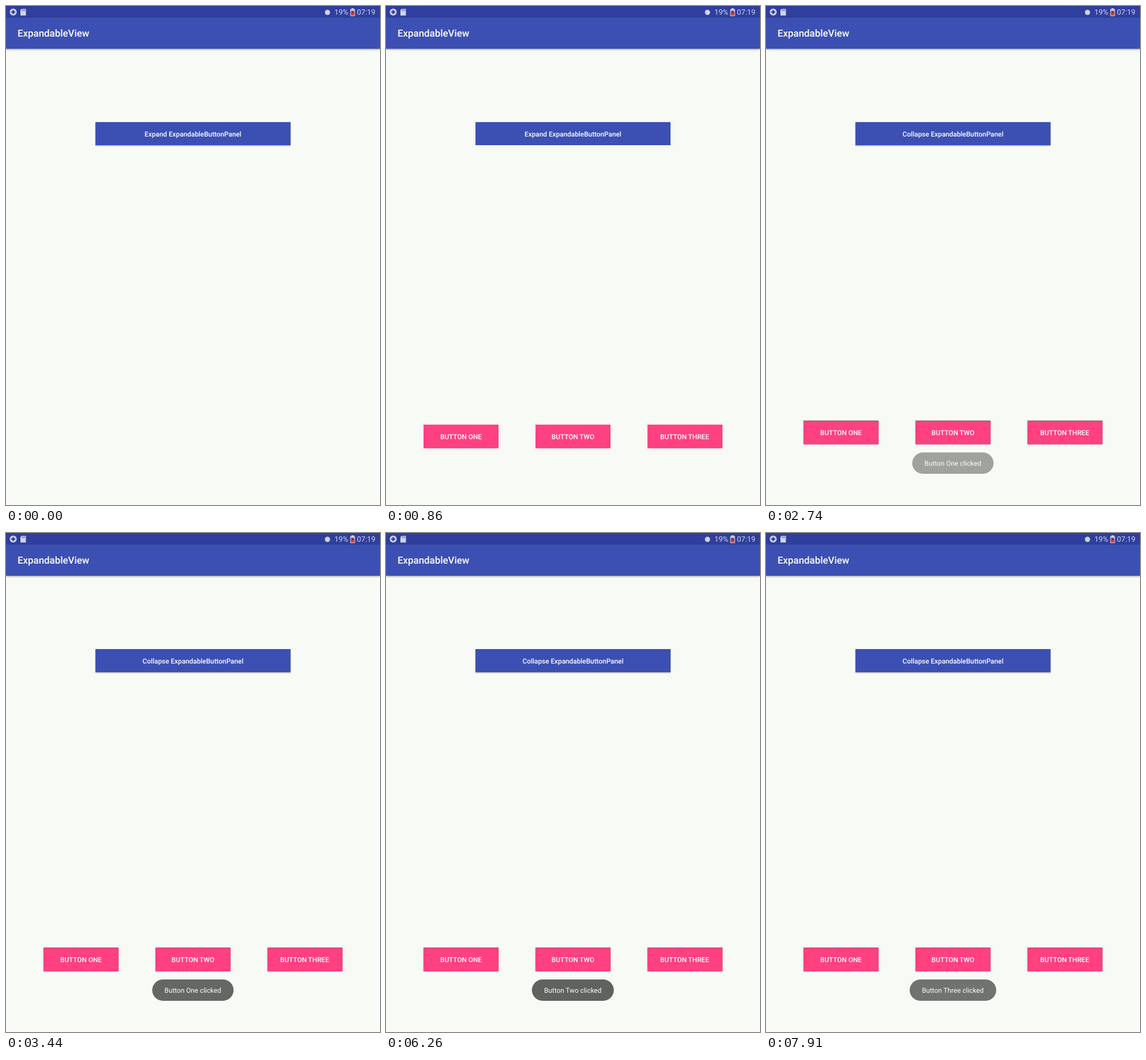
An HTML page for the animation above (8000 ms loop, 648 px wide and 864 px high).

```html
<!DOCTYPE html>
<html lang="en">
<head>
<meta charset="utf-8">
<title>ExpandableView</title>
<style>
  html, body { margin: 0; width: 100%; height: 100%; overflow: hidden; }
  #stage {
    position: relative; width: 648px; height: 864px; overflow: hidden;
    background: #f8faf5; color: #fff; font: 500 11.8px Roboto, sans-serif;
    text-rendering: geometricPrecision;
  }
  #stage > * { position: absolute; box-sizing: border-box; white-space: nowrap; }
  #status { left: 0; top: 0; }
  #appbar {
    left: 0; top: 20px; width: 648px; height: 54px; padding-left: 20px;
    background: #3c50b3; box-shadow: 0 1px 3px rgba(0, 0, 0, .45);
    font-size: 16.875px; line-height: 56px;
  }
  .button { display: flex; align-items: center; justify-content: center; }
  #toggle { left: 155px; top: 201px; width: 338px; height: 40px; padding-top: 1px; background: #3c50b3; }
  .panel { top: 718px; width: 130px; height: 41px; background: #ff4081; }
  .toast {
    left: 323.7px; top: 773px; height: 37px; padding: 0 21.5px; border-radius: 18.5px;
    transform: translateX(-50%); background: #5f625e;
    font-weight: 400; line-height: 38px; opacity: 0;
  }
</style>
</head>
<body>
<div id="stage">
  <svg id="status" width="648" height="20" fill="#d0d4ec" font-size="12.9" font-weight="400">
    <rect width="648" height="20" fill="#303f9d"/>
    <circle cx="12.5" cy="10.5" r="6"/>
    <path d="M12.5 7v7M9 10.5h7" stroke="#303f9d" stroke-width="2.4"/>
    <path d="M27 5h7.5v11.5h-9.5V7z"/>
    <path d="M28 6v2.5M30.3 6v2.5M32.6 6v2.5" stroke="#303f9d"/>
    <circle cx="557" cy="11" r="4.5"/>
    <text x="569" y="15.3">19%</text>
    <path d="M598.5 4h4v1.5h2v12h-8v-12h2z"/>
    <path d="M597.5 9.5h6v7h-6z" fill="#e5392f"/>
    <path d="M598.5 8l4 5m0-5l-4 5" stroke="#7d2038" stroke-width="1.3"/>
    <text x="608" y="15.3">07:19</text>
  </svg>
  <div id="appbar">ExpandableView</div>
  <div id="toggle" class="button"></div>
</div>
<script>
  const LOOP = 8000, SLIDE = 1000, TRAVEL = 146;
  const FADE_IN = 1550, FADE_OUT = 800;
  const stage = document.getElementById('stage');
  const toggle = document.getElementById('toggle');

  const items = [
    { name: 'One', x: 65, press: 1690, shown: 2200 },
    { name: 'Two', x: 259, press: 4230, shown: 4540 },
    { name: 'Three', x: 452.5, press: 6630, shown: 6880 }
  ];

  function add(className, text) {
    const el = document.createElement('div');
    el.className = className;
    el.textContent = text;
    stage.append(el);
    return el;
  }

  for (const item of items) {
    item.button = add('button panel', `BUTTON ${item.name.toUpperCase()}`);
    item.button.style.left = item.x + 'px';
  }
  for (const item of items) item.toast = add('toast', `Button ${item.name} clicked`);

  const progress = (t, start, duration) => Math.min(1, Math.max(0, (t - start) / duration));

  function render(t) {
    const remaining = (1 + Math.cos(Math.PI * progress(t, 0, SLIDE))) / 2;
    const settled = progress(t, SLIDE, 150);
    const toggleShadow = t < 20 ? 1 : settled;
    toggle.textContent = `${t < SLIDE ? 'Expand' : 'Collapse'} ExpandableButtonPanel`;
    toggle.style.boxShadow = `0 1px 2px rgba(0,0,0,${0.4 * toggleShadow})`;

    items.forEach(({ button, toast, press, shown }, i) => {
      const lift = progress(t, press, 100) * (1 - progress(t, press + 150, 100));
      button.style.transform = `translateY(${TRAVEL * remaining}px)`;
      button.style.boxShadow = [
        `inset 0 1px rgba(80,80,80,${0.5 * settled})`,
        `0 0 2px rgba(0,0,0,${0.4 * settled})`,
        `0 0 ${4 * lift}px rgba(0,0,0,${0.3 * lift})`
      ].join();

      const next = items[i + 1];
      const enter = 1 - (1 - progress(t, shown, FADE_IN)) ** 2;
      const leave = next ? 1 - progress(t, next.shown, FADE_OUT) ** 2 : 1;
      toast.style.opacity = enter * leave;
    });
  }

  function tick() {
    render(performance.now() % LOOP);
    requestAnimationFrame(tick);
  }
  tick();
</script>
</body>
</html>
```
